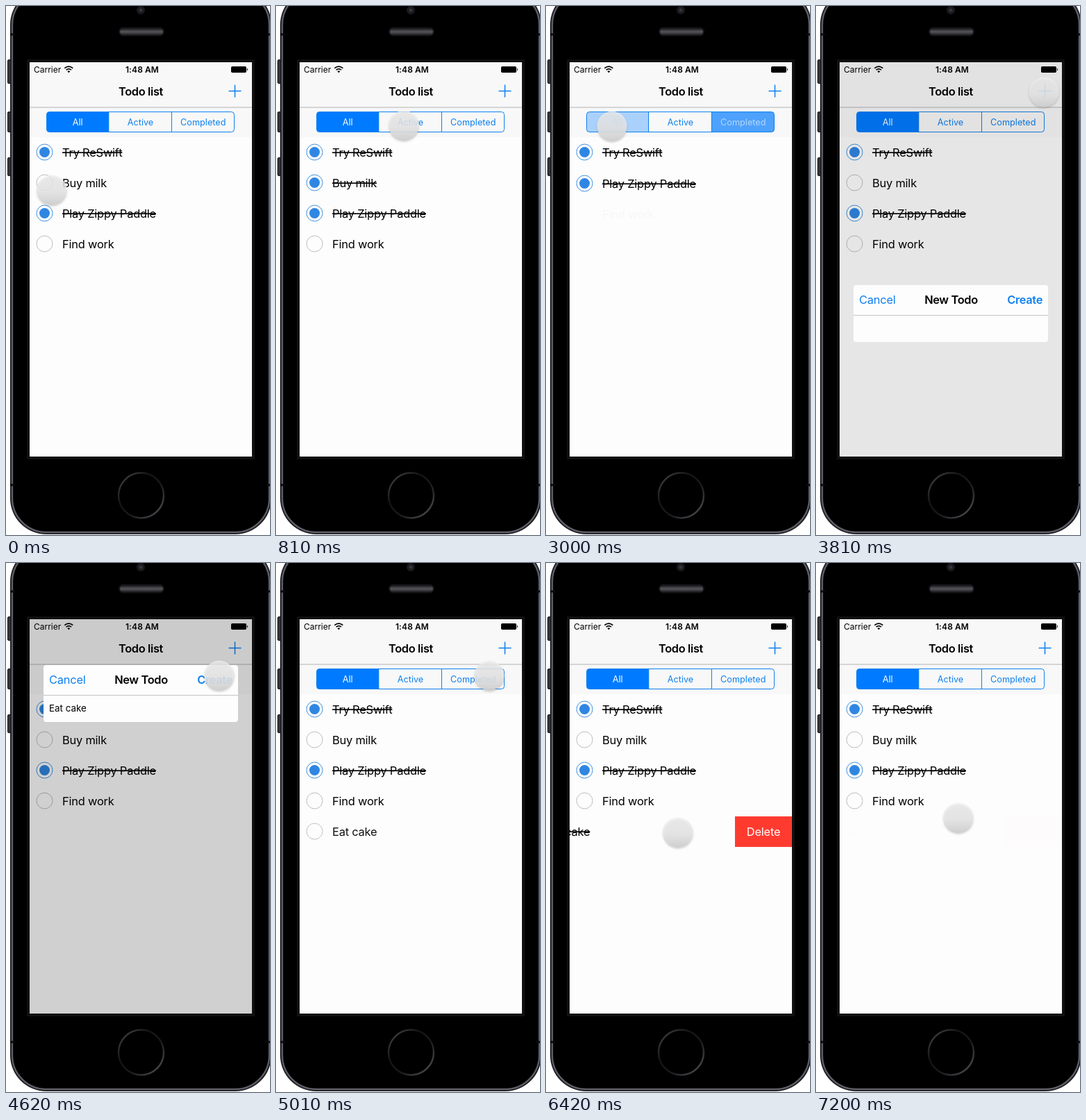
Recreate the animation shown at these times as an HTML page. Size 380 by 762 pixels, loop 7230 ms.

```html
<!DOCTYPE html>
<html lang="en">
<head>
<meta charset="utf-8">
<title>Todo list</title>
<style>
  html, body { margin: 0; width: 100%; height: 100%; overflow: hidden; background: #fff; }
  svg { display: block; width: 380px; height: 762px; }
  text { font-family: Inter, Roboto, sans-serif; font-size: 16.4px; letter-spacing: -.2px; }
  .bold { font-weight: 600; letter-spacing: -.35px; }
  .mid { text-anchor: middle; }
  .small { font-size: 12px; letter-spacing: 0; }
  .seg { font-size: 12.7px; letter-spacing: 0; }
  .blue { fill: #0f80ee; }
  .line { fill: none; stroke: #0f80ee; }
  .ring { fill: none; stroke: #bcbcbc; }
  .dot { fill: #2f86e2; visibility: hidden; }
  .done .ring { stroke: #3f90dc; }
  .done .dot { visibility: visible; }
  .done .label { text-decoration: line-through; }
</style>
</head>
<body>
<svg viewBox="0 0 380 762">
  <defs>
    <clipPath id="screen"><rect x="34" y="81" width="320" height="568"/></clipPath>
    <clipPath id="pill"><rect x="58.5" y="152.5" width="270" height="29" rx="4"/></clipPath>
    <linearGradient id="metal" x2="1" y2="1">
      <stop offset="0" stop-color="#4c4c52"/>
      <stop offset=".35" stop-color="#141416"/>
      <stop offset=".6" stop-color="#1a1a1d"/>
      <stop offset="1" stop-color="#58585e"/>
    </linearGradient>
    <linearGradient id="grille" x2="0" y2="1">
      <stop offset="0" stop-color="#1d1d20"/>
      <stop offset=".5" stop-color="#56565a"/>
      <stop offset="1" stop-color="#26262a"/>
    </linearGradient>
    <linearGradient id="ball" x2="0" y2="1">
      <stop offset="0" stop-color="#f2f2f2" stop-opacity=".72"/>
      <stop offset=".55" stop-color="#e8e8e8" stop-opacity=".82"/>
      <stop offset="1" stop-color="#cfcfcf" stop-opacity=".92"/>
    </linearGradient>
    <filter id="soft" x="-30%" y="-30%" width="160%" height="160%"><feGaussianBlur stdDeviation="1.6"/></filter>
  </defs>

  <!-- Phone -->
  <g fill="#35353a" stroke="#151518">
    <rect x="2.5" y="77.5" width="6" height="34" rx="1.5"/>
    <rect x="2.5" y="152.5" width="6" height="29" rx="1.5"/>
    <rect x="2.5" y="218.5" width="6" height="26" rx="1.5"/>
  </g>
  <rect x="6" y="-25" width="376" height="786" rx="52" fill="#1b1b20"/>
  <rect x="9" y="-22" width="370" height="780" rx="49" fill="#000" stroke="#5d5d66" stroke-width="2.4"/>
  <path d="M6 41h7M375 41h7M6 690h7M375 690h7" stroke="#0a0a0c" stroke-width="3"/>
  <circle cx="194" cy="6" r="6" fill="#1a1a1e"/>
  <circle cx="194" cy="6" r="2.5" fill="#34343c"/>
  <rect x="162" y="30.5" width="66" height="13" rx="6.5" fill="#151517"/>
  <rect x="164" y="32.5" width="62" height="9" rx="4.5" fill="url(#grille)"/>
  <circle cx="194.5" cy="705" r="32.5" fill="#000" stroke="url(#metal)" stroke-width="2.5"/>
  <rect x="30" y="77" width="328" height="576" fill="#101012"/>

  <g clip-path="url(#screen)">
    <rect x="34" y="81" width="320" height="568" fill="#fdfdfd"/>
    <g id="rows"></g>
    <rect x="34" y="81" width="320" height="108" fill="#f8f8f8"/>
    <path d="M34 146h320" stroke="#b2b2b2"/>

    <!-- Status and title -->
    <text class="small" x="40" y="95.5">Carrier</text>
    <path d="M84.3 89.7q6-5 12 0M86.6 92.2q3.7-3 7.4 0" fill="none" stroke="#000" stroke-width="1.7"/>
    <path d="M88.3 94q2-1.6 4 0l-2 2.2z"/>
    <text class="small bold mid" x="196" y="95.5" style="letter-spacing:.1px">1:48 AM</text>
    <rect x="324" y="87" width="22" height="9" rx="1.8"/>
    <path d="M347 89.5q2.2 2 0 4z"/>
    <text class="bold mid" x="194" y="129">Todo list</text>
    <path class="line" d="M320.5 122.5h18M329.5 113.5v18" stroke-width="1.5"/>

    <!-- Filter -->
    <g id="tabs" clip-path="url(#pill)"></g>
    <path class="line" d="M147.5 152v30M238.5 152v30"/>
    <rect class="line" x="58.5" y="152.5" width="270" height="29" rx="4"/>

    <!-- New entry -->
    <rect id="dim" x="34" y="81" width="320" height="568" fill-opacity=".18"/>
    <g id="sheet">
      <rect x="54" y="147" width="280" height="82" rx="4" fill="#fdfdfd"/>
      <path d="M54 190.5h280" stroke="#c4c4c4"/>
      <text class="blue" x="62" y="174">Cancel</text>
      <text class="bold mid" x="194.5" y="174">New Todo</text>
      <text class="bold blue" x="326" y="174" text-anchor="end">Create</text>
      <text id="entry" x="62" y="214" style="font-size:13.4px;letter-spacing:0"></text>
    </g>
  </g>

  <g id="cursor">
    <circle cy="2" r="21.5" fill="#888" opacity=".4" filter="url(#soft)"/>
    <circle r="21.5" fill="url(#ball)"/>
  </g>
</svg>

<script>
const LOOP = 7230, STEP = 30, ROW = 44;
const $ = id => document.getElementById(id);
const add = (id, html) => {
  $(id).insertAdjacentHTML('beforeend', html);
  return $(id).lastElementChild;
};
const move = (node, x, y) => node.setAttribute('transform', `translate(${x} ${y})`);
const mix = (a, b, p) => a + (b - a) * p;
const ease = p => {
  p = Math.min(1, Math.max(0, p));
  return p * p * p * (10 - 15 * p + 6 * p * p);
};

// What the finger does, and where.
const taps = {
  check:     { t: 240,  x: 66,  y: 265 },
  active:    { t: 930,  x: 184, y: 172 },
  completed: { t: 1350, x: 256, y: 194 },
  uncheck:   { t: 2250, x: 62,  y: 262 },
  all:       { t: 2940, x: 95,  y: 173 },
  open:      { t: 3630, x: 328, y: 124 },
  create:    { t: 4680, x: 307, y: 162 },
  finish:    { t: 5500, x: 111, y: 388 },
  swipe:     { t: 6150, x: 290, y: 388 },
  release:   { t: 6330, x: 190, y: 388 },
  remove:    { t: 6810, x: 312, y: 388 },
  leave:     { t: 7290, x: 205, y: 367 }
};
const stops = Object.values(taps);
const since = (name, t) => t >= taps[name].t;
const between = (from, to, t) => since(from, t) && !since(to, t);

// Eases a yes/no state over the given time after the latest tap.
function glide(state, t, time) {
  const last = stops.findLast(s => s.t <= t);
  return last ? mix(+state(last.t - 1), +state(last.t), ease((t - last.t) / time)) : +state(0);
}

// The pointer rests around each tap and travels in between.
function pointer(t) {
  const i = stops.findIndex(s => s.t > t);
  const to = stops[i], from = stops[i - 1] || to;
  const p = ease(((t - from.t) / (to.t - from.t) - .45) / .35) || 0;
  return [mix(from.x, to.x, p), mix(from.y, to.y, p)];
}

const tabs = [
  { name: 'All', on: t => !since('active', t) || since('all', t) },
  { name: 'Active', on: t => between('active', 'completed', t) },
  { name: 'Completed', on: t => between('completed', 'all', t) }
];
tabs.forEach((tab, i) => {
  const x = 58 + i * 90.3;
  const node = add('tabs', `<g><rect x="${x}" y="152" width="90.3" height="30" fill="#007aff"/>
    <text class="seg mid" x="${x + 45.2}" y="171.5">${tab.name}</text></g>`);
  [tab.fill, tab.label] = node.children;
});

const rows = [
  { text: 'Try ReSwift', done: () => true },
  { text: 'Buy milk', done: t => between('check', 'uncheck', t) },
  { text: 'Play Zippy Paddle', done: () => true },
  { text: 'Find work', done: () => false },
  { text: 'Eat cake', done: t => since('finish', t),
    exists: t => between('create', 'remove', t), swiped: t => since('swipe', t) }
];
for (const row of rows) {
  const button = `<rect x="354" y="-22" width="82" height="44" fill="#ff3b30"/>
    <text class="mid" x="395" y="5.5" fill="#fff">Delete</text>`;
  row.node = add('rows', `<g>
    <circle class="ring" cx="55.5" cy="-.5" r="11.5"/>
    <circle class="dot" cx="55.5" cy="-.5" r="7.5"/>
    <text class="label" x="81" y="5.5">${row.text}</text>${row.swiped ? button : ''}</g>`);
  row.shown = t => {
    const [all, , completed] = tabs.map(tab => tab.on(t));
    return (!row.exists || row.exists(t)) && (all || completed === row.done(t));
  };
}

function draw(t) {
  let y = 211;
  for (const row of rows) {
    const shown = glide(row.shown, t, 420);
    move(row.node, row.swiped ? -82 * glide(row.swiped, t, 180) : 0, y);
    row.node.setAttribute('opacity', shown);
    row.node.classList.toggle('done', row.done(t));
    y += ROW * shown;
  }
  for (const tab of tabs) {
    const on = glide(tab.on, t, 150);
    tab.fill.setAttribute('opacity', on);
    tab.label.setAttribute('fill', `rgb(${mix(15, 255, on)},${mix(128, 255, on)},${mix(238, 255, on)})`);
  }

  const open = glide(u => between('open', 'create', u), t, 360);
  $('dim').setAttribute('opacity', open);
  move($('sheet'), 0, (1 - open) * (since('create', t) ? -240 : 510));
  const typed = Math.floor((t - taps.open.t - 420) / 52);
  $('entry').textContent = 'Eat cake'.slice(0, Math.max(0, typed));
  move($('cursor'), ...pointer(t));
}

const start = performance.now();
function tick() {
  const t = (performance.now() - start) % LOOP;
  draw(Math.floor(t / STEP) * STEP);
  requestAnimationFrame(tick);
}
tick();
</script>
</body>
</html>
```
